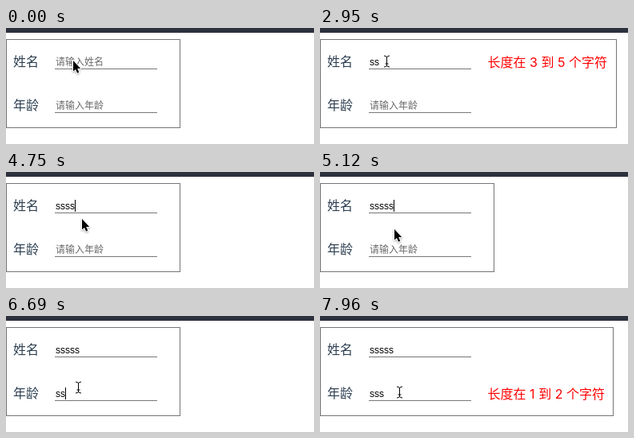
Animation of 385 by 146 pixels, one loop 7.99 s. Source, as an HTML page:

```html
<!DOCTYPE html>
<html lang="zh-CN">
<head>
<meta charset="utf-8">
<title>表单校验</title>
<style>
  html, body { margin: 0; width: 100%; height: 100%; overflow: hidden; background: #fff; }
  svg { display: block; width: 385px; height: 146px; }
  text { font-family: "Noto Sans CJK SC", "Noto Sans CJK", sans-serif; white-space: pre; }
  .label { font-size: 16px; fill: #2c3e50; }
  .hint { font-size: 12px; fill: #696969; }
  .value { font: 12px "Liberation Sans", Arial, sans-serif; fill: #000; }
  .error { font-size: 16px; fill: #f00; }
  .num { font-family: Inter, "Noto Sans CJK SC", sans-serif; }
  #arrow { filter: drop-shadow(0 1px 1px rgba(0, 0, 0, .35)); }
</style>
</head>
<body>
<svg viewBox="0 0 385 146">
  <rect width="385" height="6" fill="#2d313d"/>
  <rect id="box" x=".5" y="14.5" height="111" fill="none" stroke="#747474"/>
  <g id="rows"></g>
  <rect id="caret" x="62" y="35" width="1" height="15"/>
  <g id="pointer">
    <path id="arrow" d="M0 0V13.6L3 10.9 5.1 15.7 7.3 14.8 5.2 10.1H9.2Z" stroke="#fff" stroke-width="2" stroke-linejoin="round" paint-order="stroke"/>
    <g id="beam" fill="none" transform="translate(-.5 1)">
      <path id="stem" d="M-3.5-7Q0-7 0-5Q0-7 3.5-7M0-5V5M-3.5 7Q0 7 0 5Q0 7 3.5 7M-2 3H2" stroke="#fff" stroke-width="2.4" stroke-opacity=".7"/>
      <use href="#stem" style="stroke: #000"/>
    </g>
  </g>
</svg>
<script>
const LOOP = 7990, BLINK = 496, ROW = 55, CHAR = 6;
const $ = id => document.getElementById(id);

// keys: times at which an "s" is typed; wide: box width while the error shows
const fields = [
  { label: '姓名', min: 3, max: 5, focus: 670, keys: [1280, 1460, 4330, 4750, 4930], wide: 370 },
  { label: '年龄', min: 1, max: 2, focus: 5740, keys: [6190, 6690, 7140], wide: 366 }
];

const moves = [
  { start: 3230, end: 3620, to: [95, 59], sag: 0 },
  { start: 4930, end: 5560, to: [91, 89], sag: 0 },
  { start: 7605, end: 7950, to: [100, 95], sag: 5 }
];

const num = n => `<tspan class="num"> ${n} </tspan>`;

$('rows').innerHTML = fields.map((f, i) => `
  <g transform="translate(0 ${i * ROW})">
    <text class="label" x="9" y="48">${f.label}</text>
    <rect x="61" y="51" width="128" height="1" fill="#767676"/>
    <text class="hint" id="hint${i}" x="62" y="47">请输入${f.label}</text>
    <text class="value" id="value${i}" x="62" y="47"></text>
    <text class="error" id="error${i}" x="209.6" y="49">长度在${num(f.min)}到${num(f.max)}个字符</text>
  </g>`).join('');

$('beam').lastElementChild.replaceWith($('stem').cloneNode());
const ink = $('beam').lastElementChild;
ink.removeAttribute('id');
ink.setAttribute('stroke', '#000');
ink.setAttribute('stroke-width', 1);
ink.setAttribute('stroke-opacity', 1);

const show = (id, on) => $(id).setAttribute('visibility', on ? 'visible' : 'hidden');

function pointerAt(t) {
  let pos = [84, 41];
  for (const m of moves) {
    const k = Math.min(1, Math.max(0, (t - m.start) / (m.end - m.start)));
    const ease = 1 - (1 - k) ** 1.5;
    pos = pos.map((p, i) => p + (m.to[i] - p) * ease);
    pos[1] += m.sag * Math.sin(Math.PI * k);
  }
  return pos.map(Math.round);
}

function render(t) {
  let width = 217;
  const counts = fields.map(f => f.keys.filter(k => k <= t).length);

  fields.forEach((f, i) => {
    const n = counts[i];
    const bad = n > 0 && (n < f.min || n > f.max);
    if (bad) width = f.wide;
    $('value' + i).textContent = 's'.repeat(n);
    show('hint' + i, n === 0);
    show('error' + i, bad);
  });
  $('box').setAttribute('width', width);

  // the caret blinks, starting over at each key
  const at = t < fields[1].focus ? 0 : 1;
  const { focus, keys } = fields[at];
  const last = Math.max(focus, ...keys.filter(k => k <= t));
  show('caret', t >= focus && Math.floor((t - last) / BLINK) % 2 === 0);
  $('caret').setAttribute('transform', `translate(${CHAR * counts[at]} ${ROW * at})`);

  const [x, y] = pointerAt(t);
  const beam = t >= 650 && (y < 51 || y > 85);
  const hidden = t >= 1280 && t < 2110;   // typing hides the pointer
  show('arrow', !beam && !hidden);
  show('beam', beam && !hidden);
  $('pointer').setAttribute('transform', `translate(${x} ${y})`);
}

function tick() {
  render(performance.now() % LOOP);
  requestAnimationFrame(tick);
}
tick();
</script>
</body>
</html>
```
